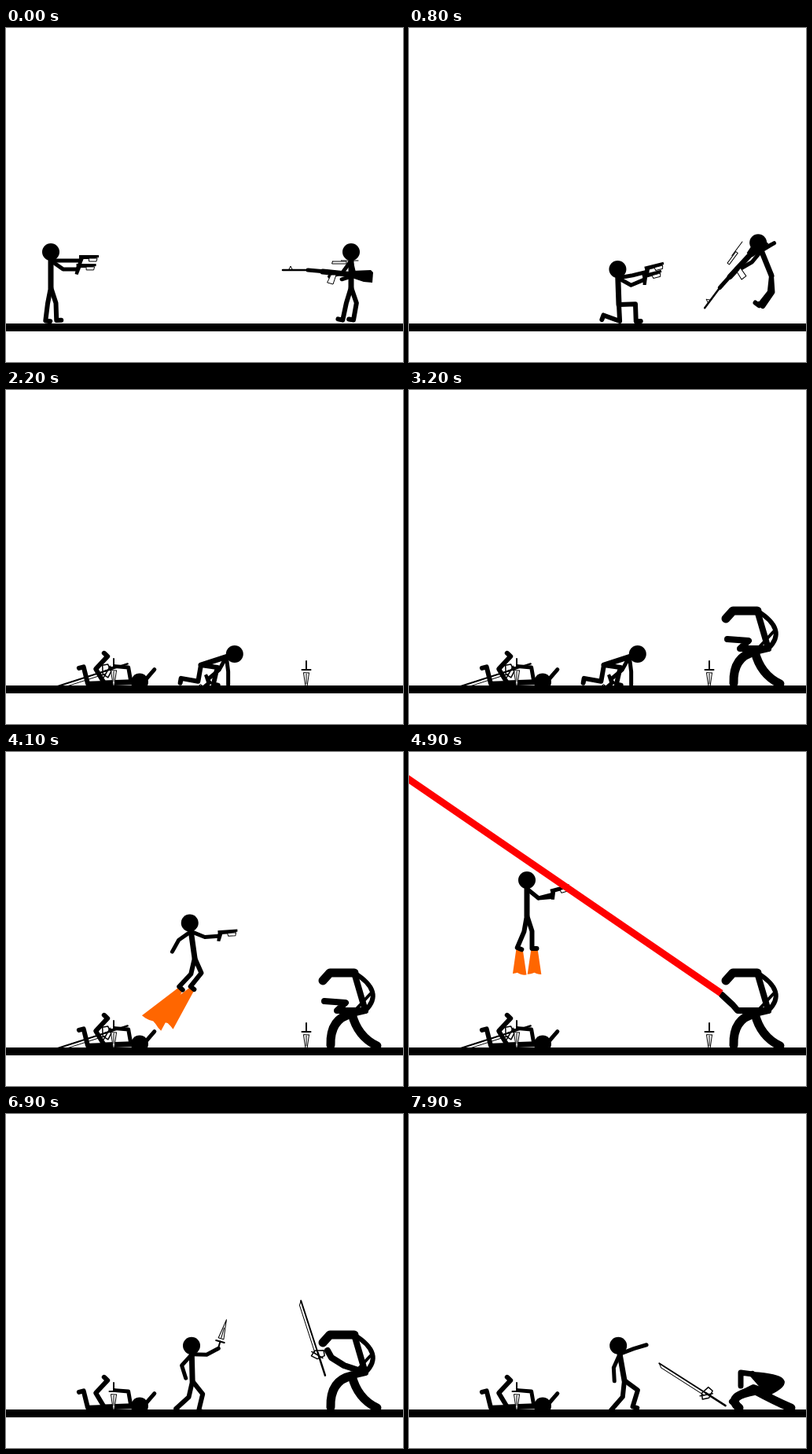
Animation of 505 by 425 pixels, one loop 8 s. Source, as an HTML page with a canvas:

```html
<!DOCTYPE html>
<html lang="en">
<head>
<meta charset="utf-8">
<title>Stick duel</title>
<style>
html, body { margin: 0; width: 100%; height: 100%; overflow: hidden; background: #fff; }
canvas { display: block; }
</style>
</head>
<body>
<canvas id="c" width="505" height="425"></canvas>
<script>
const ctx = document.getElementById('c').getContext('2d');
const LOOP = 8000, STEP = 100, GROUND = 376;

const clamp = v => Math.min(1, Math.max(0, v));
const mix = (a, b, k) => Array.isArray(a) ? a.map((v, i) => mix(v, b[i], k)) : a + (b - a) * k;
const ray = ([x, y], deg, len) => [x + len * Math.cos(deg * Math.PI / 180), y + len * Math.sin(deg * Math.PI / 180)];

// Keys are [time, ...values]; returns the mixed values, the progress and the key left behind.
function at(keys, t) {
  let i = 0;
  while (i < keys.length - 2 && t >= keys[i + 1][0]) i++;
  const a = keys[i], b = keys[i + 1], k = clamp((t - a[0]) / (b[0] - a[0]));
  return { v: mix(a.slice(1, 4), b.slice(1, 4), k), k, from: a };
}

function line(pts, width, color = '#000') {
  ctx.beginPath();
  pts.forEach(p => ctx.lineTo(...p));
  ctx.lineWidth = width;
  ctx.strokeStyle = color;
  ctx.stroke();
}
function bend(a, mid, b, width, fill) {
  ctx.beginPath();
  ctx.moveTo(...a);
  ctx.quadraticCurveTo(...mid, ...b);
  ctx.lineWidth = width;
  ctx.strokeStyle = ctx.fillStyle = '#000';
  if (fill) ctx.fill();
  ctx.stroke();
}
function poly(pts, fill, width) {
  ctx.beginPath();
  pts.forEach(p => ctx.lineTo(...p));
  ctx.closePath();
  ctx.fillStyle = fill;
  ctx.fill();
  if (width) {
    ctx.lineWidth = width;
    ctx.strokeStyle = '#000';
    ctx.stroke();
  }
}
function local([x, y, ang], draw) {
  ctx.save();
  ctx.translate(x, y);
  ctx.rotate(ang);
  draw();
  ctx.restore();
}

// Bone angles in degrees: torso, two arms, two legs
const aim    = [ -90, [  0,   0], [ 35,  0], [101,  97], [ 72,  88]];
const kneel  = [ -92, [-10, -14], [ 29, -23], [ 87, 200], [ -2,  88]];
const crouch = [ -18, [119, 140], [ 83,  90], [100, 190], [  8, 103]];
const fly    = [ -98, [ 22,  -4], [145, 119], [103, 133], [ 66, 129]];
const hover  = [ -90, [ 39, -15], [ 39,  -5], [100, 113], [ 72,  90]];
const ready  = [ -90, [  5, -30], [135,  70], [104, 139], [ 54, 103]];
const toss   = [-100, [-21, -17], [114,  87], [ 96, 131], [ 36, 107]];
const rifleman = [-90, [126, 163], [77, 162], [107, 102], [ 71, 100]];
const dive   = [-112, [-31, 153], [130, 150], [ 96, 128], [ 86, 124]];
const lying  = [  -2, [260, 185], [-10, -49], [178, 256], [239, -47]];

// [time, pose, hip x, hip y, hop height, spin]
const heroKeys = [
  [0, aim, 57, 330, 40], [800, kneel, 267, 352, 70], [1700, aim, 300, 331], [2200, crouch, 248, 350],
  [3400, crouch, 248, 350], [4100, fly, 240, 262], [4300, fly, 255, 178], [4600, hover, 185, 222],
  [4900, hover, 150, 208], [5400, ready, 245, 340], [5800, kneel, 345, 352], [6100, ready, 333, 340, 65],
  [6800, ready, 230, 340], [7500, toss, 280, 339], [7900, toss, 274, 339]
];
const rivalKeys = [
  [0, rifleman, 439, 330, 65], [800, dive, 461, 315], [1000, rifleman, 440, 331, 270, -360], [2000, lying, 125, 373]
];

function actor(keys, t, facing) {
  const { v: [pose, x, y], k, from: [, , , , hop = 0, spin = 0] } = at(keys, t);
  const hip = [x, y - 4 * hop * k * (1 - k)];
  const turn = a => a + spin * k;
  const neck = ray(hip, turn(pose[0]), 34);
  const arms = [pose[1], pose[2]].map(([a, b]) => {
    const elbow = ray(neck, turn(a), 19);
    return [neck, elbow, ray(elbow, turn(b), 17)];
  });
  const legs = [pose[3], pose[4]].map(([a, b]) => {
    const knee = ray(hip, turn(a), 21), foot = ray(knee, turn(b), 22);
    return [hip, knee, foot, ray(foot, turn(b) - 90 * facing, 6)];
  });
  return { hip, neck, arms, legs, head: ray(neck, turn(pose[0]), 11), grip: turn(pose[1][1]) * Math.PI / 180 };
}
function figure({ hip, neck, head, arms, legs }) {
  arms.forEach(a => line(a, 5));
  line([head, neck, hip], 7);
  legs.forEach(l => line(l, 6));
  ctx.beginPath();
  ctx.arc(...head, 11, 0, 7);
  ctx.fillStyle = '#000';
  ctx.fill();
}

function pistol(hand, ang) {
  local([...hand, ang], () => {
    poly([[0, -7], [25, -7], [25, -4], [15, -2], [0, -2]], '#000');
    poly([[12, -3], [23, -3], [22, 1], [13, 1]], '#fff', 1);
    poly([[0, -3], [6, -3], [2, 7], [-2, 6]], '#000');
  });
}
function rifle(pos) {
  local(pos, () => {
    line([[-78, -4], [-45, -4]], 2.5);
    line([[-46, -4], [-12, -1]], 5);
    line([[-27, -2], [12, 2]], 7);
    poly([[10, -3], [34, -4], [37, -1], [36, 12], [25, 11], [10, 6]], '#000');
    line([[-70, -5], [-68, -9], [-66, -5]], 1);
    poly([[-17, 2], [-10, 2], [-14, 14], [-21, 12]], '#fff', 1);
    poly([[-15, -15], [3, -15], [3, -12], [-15, -12]], '#fff', 1);
    line([[-4, -16], [18, -16]], 1);
  });
}
function dagger(pos) {
  local(pos, () => {
    line([[-11, 0], [0, 0]], 2);
    line([[0, -5.5], [0, 5.5]], 2);
    poly([[4, -3.5], [20, -1.2], [29, 0], [20, 1.2], [4, 3.5]], '#fff', 1);
    line([[5, 0], [18, 0]], 1);
  });
}
function sword(pos) {
  local(pos, () => {
    line([[-28, 0], [2, 0]], 2.5);
    line([[0, 0], [72, 0]], 2);
    line([[72, 0], [67, -3.5], [2, -3.5]], 1);
    line([[-5, -3], [1, -9], [6, -3], [3, 8], [-4, 7], [-5, -3]], 1.5);
    line([[-6, 4], [6, -7]], 1.5);
  });
}
const rifleKeys = [[0, 430, 312, 0], [800, 426, 296, -.93], [1000, 430, 313, 0], [1800, 590, 200, 5]];
const swordKeys = [
  [1800, 170, 80, 1.6], [2100, 128, 357, 2.83], [5200, 128, 357, 2.83], [5800, 402, 316, 5.52],
  [6100, 402, 316, 5.52], [6500, 388, 318, 3.6], [7100, 402, 300, 4.8], [7900, 379, 356, 3.71]
];

// A ragged fan that grows and tilts while the hero accelerates
function flame([x, y], t, seed) {
  const burst = clamp(1 - Math.abs(t - 4100) / 500);
  const len = 34 + 26 * burst;
  const pts = [[x + 4, y], [x - 4, y]];
  for (let i = 0; i <= 6; i++) {
    const noise = Math.abs(Math.sin(seed * 12.9 + i * 78.2));
    pts.push(ray([x, y], 90 + 40 * burst + 15 * (1 - i / 3), len * (.9 + .12 * noise)));
  }
  poly(pts, '#ff6600');
}

// Jaw, brow, nape, back, hip, crotch, knee, foot, knee, foot
const hulk  = [[403,291], [412,281], [443,281], [482,305], [457,329], [440,333], [412,339], [413,373], [447,362], [472,374]];
const slump = [[422,346], [422,329], [437,331], [500,335], [458,355], [441,352], [402,359], [420,374], [465,365], [486,374]];
const folded = [[421,329], [432,319], [405,317]];
const point  = [[418,329], [412,322], [398,309]];
const wield  = [[430,320], [414,310], [409,301]];
const limp   = [[438,348], [424,355], [411,366]];
const armKeys = [
  [4100, folded], [4300, point], [5100, point], [5300, folded], [5800, wield], [6100, wield],
  [6500, point], [6800, wield], [7400, wield], [7900, limp]
];

function brute(t) {
  const drop = 1 - clamp((t - 2500) / 600) ** 2;
  const fall = clamp((t - 7500) / 400);
  const [jaw, brow, nape, back, hip, crotch, ...legs] = mix(hulk, slump, fall);
  const [arm] = at(armKeys, t).v;
  local([-125 * drop, -370 * drop, 0], () => {
    bend(crotch, legs[0], legs[1], 11);
    bend(crotch, legs[2], legs[3], 11);
    line([nape, hip, crotch], 8);
    bend(nape, back, hip, 6, fall > .5);
    line([crotch, mix(mix(nape, hip, .5), back, .5)], 4);
    line([jaw, brow, nape], 11 - 4 * fall);
    line([hip, ...arm], 8);
  });
  return arm[2];
}
function beam([x, y], end) {
  ctx.lineCap = 'butt';
  line([[-10, end - 7], [x - 1, y - 2]], 9, '#f00');
  ctx.lineCap = 'round';
}

function draw(t) {
  ctx.fillStyle = '#fff';
  ctx.fillRect(0, 0, 505, 425);
  ctx.lineCap = ctx.lineJoin = 'round';

  const hero = actor(heroKeys, t, 1);
  const hands = hero.arms.map(a => a[2]);

  figure(actor(rivalKeys, t, t < 1500 ? -1 : 1));
  if (t < 1800) rifle(at(rifleKeys, t).v);
  if (t >= 1900) {
    const k = clamp((t - 1900) / 300);
    dagger([137, mix(60, 353, k), Math.PI / 2]);
    if (t < 5800) dagger([382, mix(25, 356, k), Math.PI / 2]);
  }

  if (t >= 3600 && t < 5100) hero.legs.forEach((leg, i) => flame(mix(leg[2], leg[3], .5), t, t / STEP + i));
  figure(hero);
  if (t < 5300) pistol(hands[0], hero.grip);
  if (t < 1900) pistol(hands[1], hero.grip);
  if (t >= 5800 && t < 7500) dagger([...ray(hands[0], -76, 9), hero.grip - .8]);
  if (t >= 7500 && t < 7800) dagger([...mix([320, 293], [430, 333], (t - 7500) / 300), .35]);

  if (t >= 2600) {
    const hand = brute(t);
    if (t >= 4300 && t < 4500) beam(hand, 94);
    if (t >= 4700 && t < 5100) beam(hand, 35 - (t - 4900) * .12);
  }
  if (t >= 1900) sword(at(swordKeys, t).v);

  ctx.fillStyle = '#fff';
  ctx.fillRect(0, GROUND, 505, 49);
  ctx.fillStyle = '#000';
  ctx.fillRect(0, GROUND, 505, 10);
}

const start = performance.now();
function tick() {
  const t = (performance.now() - start) % LOOP;
  draw(Math.floor(t / STEP) * STEP);
  requestAnimationFrame(tick);
}
tick();
</script>
</body>
</html>
```
